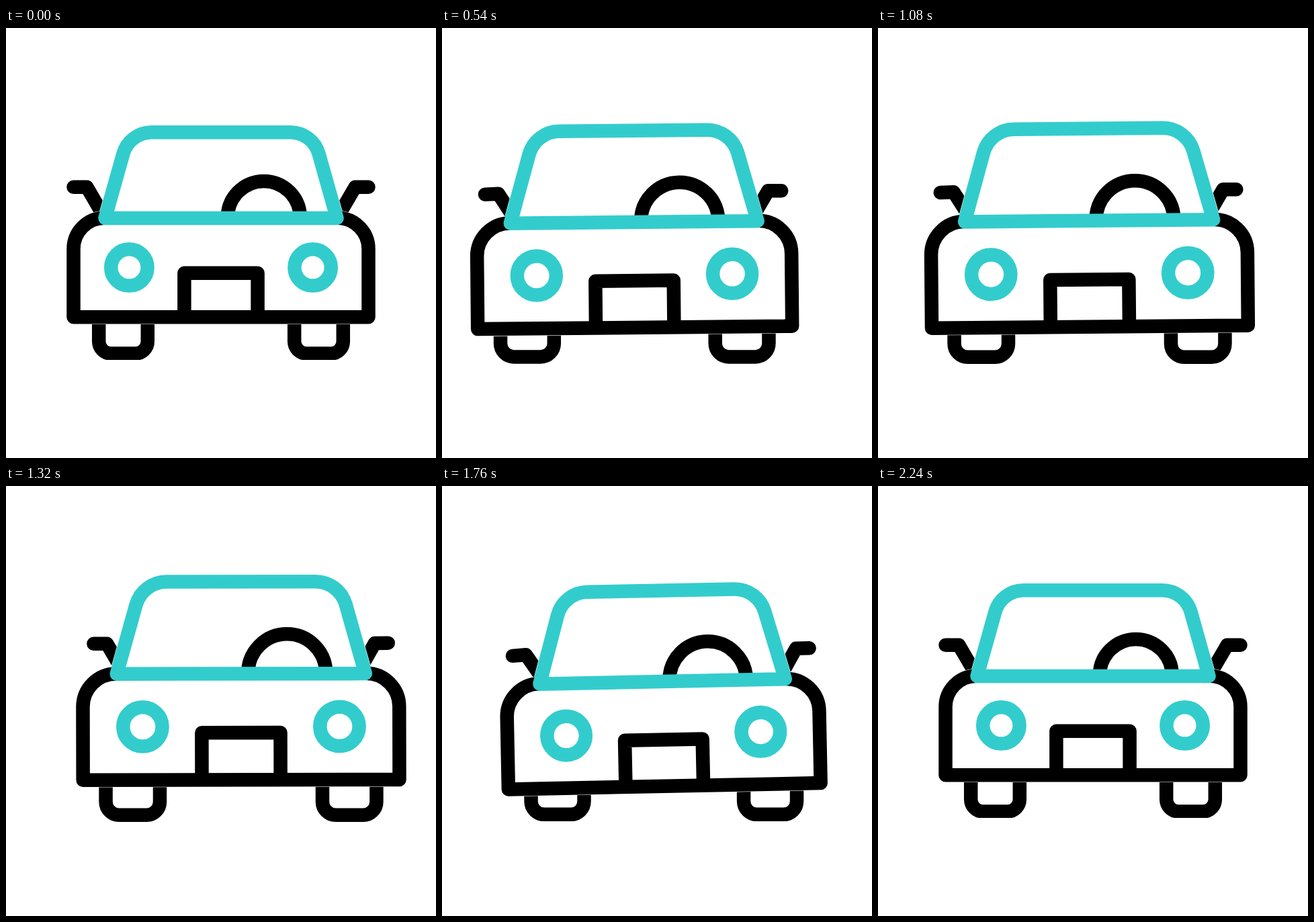
Animation of 640 by 640 pixels, one loop 2400 ms. Source, as an HTML page:

```html
<!DOCTYPE html>
<html lang="en">
<head>
<meta charset="utf-8">
<title>Car</title>
<style>
  html, body { margin: 0; width: 100%; height: 100%; overflow: hidden; background: #fff; }
  svg { display: block; fill: none; stroke: #000; stroke-width: 20.5; stroke-linejoin: round; }
  path, circle { vector-effect: non-scaling-stroke; }
  .teal { stroke: #3cc; }
  .halo { fill: #fff; stroke: #fff; stroke-width: 21.6; }
  .round { stroke-linecap: round; }
</style>
</head>
<body>
<svg width="640" height="640" viewBox="0 0 640 640">
  <defs>
    <path id="shell" d="M146.5 282.7A46 46 0 0 0 100.5 328.7V430.2H539.5V328.7A46 46 0 0 0 493.5 282.7"/>
    <path id="glass" d="M147.5 283L174.4 187.3A44 44 0 0 1 216.7 155.2H423.3A44 44 0 0 1 465.6 187.3L492.5 283Z"/>
    <path id="wheel" d="M138.2 400V466.6A18 18 0 0 0 156.2 484.6H192.8A18 18 0 0 0 210.8 466.6V400"/>
    <path id="mirror" d="M-39.5 -45.2H-19.7L5 -3"/>
  </defs>
  <g id="wheels">
    <use href="#wheel"/>
    <use href="#wheel" x="291"/>
  </g>
  <rect id="ground" width="640" height="20" fill="#fff" stroke="none"/>
  <g class="round">
    <use id="mirrorL" href="#mirror"/>
    <use id="mirrorR" href="#mirror"/>
  </g>
  <g id="body">
    <use href="#glass" class="halo"/>
    <use href="#shell" class="halo"/>
    <use href="#shell"/>
    <path d="M265.4 430.2V364.8H374.6V430.2"/>
    <path d="M329.8 282A54 54 0 0 1 437.8 282"/>
    <g class="teal">
      <circle cx="183.4" cy="356.4" r="27.2"/>
      <circle cx="456.6" cy="356.4" r="27.2"/>
      <use href="#glass"/>
    </g>
  </g>
</svg>
<script>
  const LOOP = 2400, PIVOT_Y = 385;

  // Turning points as [time in ms, value]; the motion eases from one to the next.
  const growth = [[0, 0], [670, 1], [1570, 1], [2240, 0]];
  const drive = [[120, 320], [800, 271.3], [1325, 350], [2050, 320]];
  const bounce = [[0, 0], [600, 13], [935, -7], [1110, 12.5], [1430, .8], [1800, 14.3], [2240, 0]];
  const roll = [[0, 0], [500, -.6], [960, 2], [1180, -2.3], [1500, 3.1], [1830, -1.65], [2240, 0]];

  const $ = id => document.getElementById(id);
  const place = (id, transform) => $(id).setAttribute("transform", transform);

  function ease(points, t) {
    const next = points.findIndex(p => p[0] > t);
    if (next < 1) return points.at(next)[1];
    const [t0, v0] = points[next - 1], [t1, v1] = points[next];
    return v0 + (v1 - v0) * (1 - Math.cos(Math.PI * (t - t0) / (t1 - t0))) / 2;
  }

  function draw(now) {
    const t = now % LOOP;
    const grow = ease(growth, t), x = ease(drive, t), lift = ease(bounce, t), tilt = ease(roll, t);
    const scale = 1 + .0725 * grow;
    const base = `translate(${x} ${PIVOT_Y + lift}) rotate(${tilt})`;

    place("body", `${base} scale(${scale}) translate(-320 ${-PIVOT_Y})`);
    place("wheels", `translate(${x} 436) scale(${1 + .108 * grow}) translate(-320 -436)`);
    $("ground").setAttribute("y", 494 + 7 * grow);

    // The mirrors keep their size, sway with the roll and flap with the bounce.
    const mirrorY = -85 * scale - 18;
    const sway = 1.6 * tilt, flap = .2 * (6 * grow - lift);
    place("mirrorL", `${base} translate(-180 ${mirrorY}) rotate(${sway + flap})`);
    place("mirrorR", `${base} translate(180 ${mirrorY}) rotate(${sway - flap}) scale(-1 1)`);
    requestAnimationFrame(() => draw(performance.now() - start));
  }

  const start = performance.now();
  draw(0);
</script>
</body>
</html>
```
